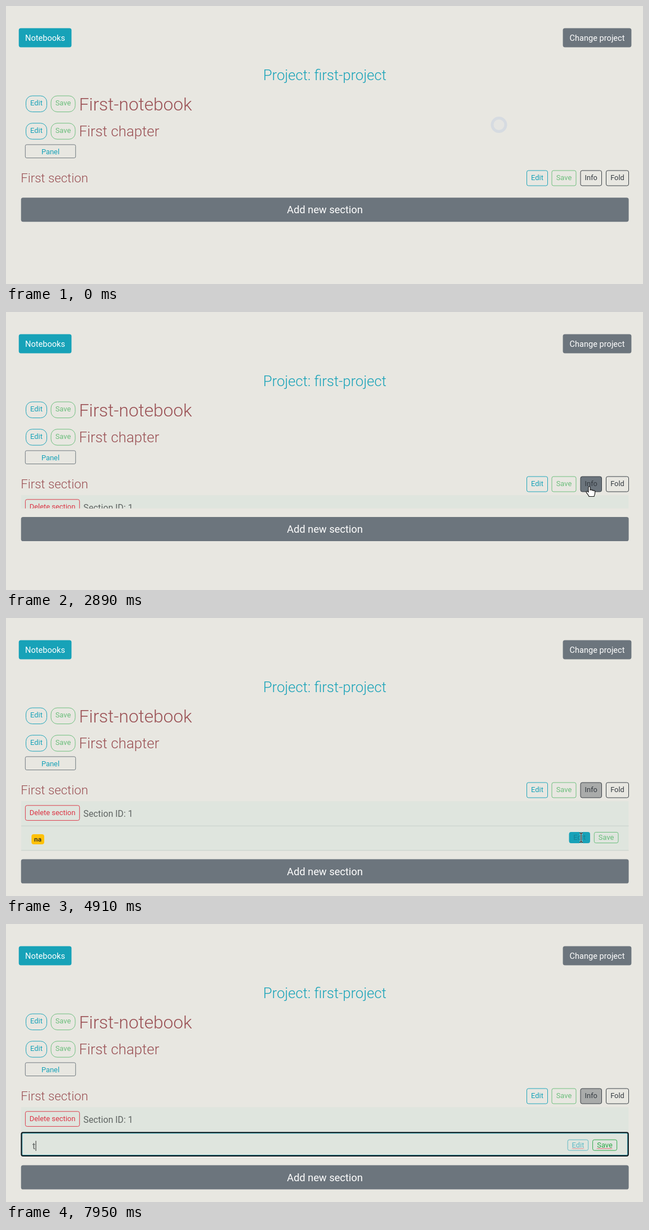
An HTML page for the animation above (8 s loop, 1132 by 495 pixels).

```html
<!DOCTYPE html>
<html lang="en">
<head>
<meta charset="utf-8">
<title>Notebook section editor</title>
<style>
  html, body { margin: 0; width: 100%; height: 100%; overflow: hidden; background: #e8e7e1; }
  svg { display: block; width: 1132px; height: 495px; font-family: Roboto, sans-serif; }
</style>
</head>
<body>
<svg id="stage" viewBox="0 0 1132 495"></svg>
<script>
const LOOP = 8000;
const stage = document.getElementById('stage');
const TEAL = '#17a2b8', GREEN = '#28a745', GREY = '#6c757d', DARK = '#343a40',
      RED = '#dc3545', BROWN = '#9a5054', INK = '#5f6462';

const clamp = v => Math.min(1, Math.max(0, v));
const ramp = (t, start, length = 150) => clamp((t - start) / length);

// CSS "ease", cubic-bezier(.25, .1, .25, 1)
function ease(x) {
  let lo = 0, hi = 1;
  for (let i = 0; i < 20; i++) {
    const u = (lo + hi) / 2;
    if (.75 * u * (1 - u) + u ** 3 < x) lo = u; else hi = u;
  }
  return .3 * lo * (1 - lo) ** 2 + 3 * lo * lo * (1 - lo) + lo ** 3;
}

const text = (s, x, y, size, fill, more = '') =>
  `<text x="${x}" y="${y}" font-size="${size}" fill="${fill}" ${more}>${s}</text>`;
const heading = (s, x, y, size, fill = BROWN, more = '') =>
  text(s, x, y, size, fill, `font-weight="300" ${more}`);
const centred = (s, x, y, size, fill) => text(s, x, y, size, fill, 'text-anchor="middle"');
const box = (x, y, w, h, r, fill, more = '') =>
  `<rect x="${x}" y="${y}" width="${w}" height="${h}" rx="${r}" fill="${fill}" ${more}/>`;

function solid(label, x, y, w, h, size, fill) {
  return box(x, y, w, h, 3.7, fill) + centred(label, x + w / 2, y + h / 2 + size * .35, size, '#fff');
}

// Outlined button; the baseline is given relative to the top edge
function outlined(label, x, y, w, h, base, color, { r = 3, faded = false, ink = color, under = '' } = {}) {
  return `<g opacity="${faded ? .65 : 1}">${under}` +
    box(x, y, w, h, r, 'none', `stroke="${color}" stroke-width=".95"`) +
    centred(label, x + w / 2, y + base, 12.9, ink) + '</g>';
}

function pair(x, y, r, h, base) {
  return outlined('Edit', x, y, 37, h, base, TEAL, { r }) +
         outlined('Save', x + 44.5, y, 43, h, base, GREEN, { r, faded: true });
}

function header() {
  return solid('Notebooks', 22.7, 39.5, 93.7, 34, 14.6, TEAL) +
    solid('Change project', 989.6, 39.5, 121.8, 34, 14.6, GREY) +
    heading('Project: first-project', 566.5, 131.5, 25.6, TEAL, 'text-anchor="middle"') +
    pair(35.5, 160, 11, 28.5, 17) + heading('First-notebook', 129.8, 186, 31.6) +
    pair(35.5, 208.7, 11, 28.5, 17.3) + heading('First chapter', 129.8, 232, 25.8) +
    outlined('Panel', 34.3, 246.9, 89.4, 23.6, 16.7, GREY, { r: 2.5, ink: TEAL }) +
    heading('First section', 26.2, 313.5, 22.2);
}

function sectionButtons(t) {
  const hover = ramp(t, 2130) - ramp(t, 3680);
  const fill = (color, alpha) => box(1021, 293, 37.5, 27, 3, color, `fill-opacity="${alpha}"`);
  const under = fill('#a9abaa', ramp(t, 2670)) + fill(GREY, hover);
  return pair(925.5, 293, 3, 27, 17.2) +
    outlined('Info', 1021, 293, 37.5, 27, 17.2, DARK, { under }) +
    outlined('Fold', 1066.5, 293, 40, 27, 17.2, DARK);
}

function tagRow(t) {
  if (t < 4960) {
    const hover = ramp(t, 4440);
    const under = box(1001, 381.5, 36.5, 19, 2.5, TEAL, `fill-opacity="${hover}"`);
    return box(27, 413.3, 1079.5, 1, 0, '#c8cfca') +
      box(45.3, 384.9, 22.6, 18, 4, '#ffc107') +
      text('na', 56.6, 397.6, 11.8, '#212529', 'text-anchor="middle" font-weight="500"') +
      outlined('Edit', 1001, 381.5, 36.5, 19, 13.7, TEAL, { under, ink: hover > .5 ? '#178296' : TEAL }) +
      outlined('Save', 1045.3, 381.5, 42.7, 19, 13.7, GREEN, { faded: true });
  }
  const typed = t < 6480 ? 'na' : t < 6640 ? 'n' : t < 7940 ? '' : 't';
  const caret = { na: 64.6, n: 55.8, t: 52.6 }[typed];
  const focus = t < 6000 ? '' :
    box(25.7, 369.7, 1081.6, 45, 4, 'none', 'stroke="#fff" stroke-opacity=".5"') +
    box(27.4, 371.3, 1078.4, 41.6, 3, 'none', 'stroke="#0c181d" stroke-width="2.1"');
  return box(28.8, 372.7, 1075.6, 38.8, 2, 'none', `stroke="${TEAL}" stroke-width=".9"`) + focus +
    text(typed, 47, 400.5, 15.8, INK) +
    (caret && t >= 6000 ? box(caret, 386, 1, 18, 0, '#333') : '') +
    outlined('Edit', 998.2, 384.2, 36.5, 19, 13.5, TEAL, { faded: true }) +
    outlined('Save', 1042.6, 384.2, 43, 19, 13.5, GREEN) +
    (typed === 't' ? squiggle(1006, 1027, .65) + squiggle(1050, 1078, 1) : '');
}

function squiggle(from, to, opacity) {
  let d = `M${from} 400.5`;
  for (let x = from + 1.5, up = true; x <= to; x += 1.5, up = !up) d += `L${x} ${up ? 399 : 400.5}`;
  return `<path d="${d}" fill="none" stroke="${RED}" stroke-width=".8" opacity="${opacity}"/>`;
}

function details(t) {
  const height = 88.3 * ease(ramp(t, 2825, 350));
  const panel = box(27, 326.2, 1079.5, 88, 0, '#dfe5de') +
    box(27, 369.7, 1079.5, 1, 0, '#c8cfca') +
    outlined('Delete section', 34.4, 333.8, 96.3, 26.6, 17.2, RED) +
    text('Section ID: 1', 137.6, 354, 15.8, INK) + tagRow(t);
  return `<clipPath id="fold"><rect x="0" y="326" width="1132" height="${height}"/></clipPath>` +
    `<g ${height < 88 ? 'clip-path="url(#fold)"' : ''}>${height > 0 ? panel : ''}</g>` +
    solid('Add new section', 26.7, 341.3 + height, 1079.9, 43, 18.3, GREY);
}

function ring(t) {
  const opacity = 1 - ramp(t, 50, 170);
  return `<circle cx="876" cy="211.5" r="12" fill="#e2e4e3" fill-opacity=".6" stroke="#d6dbe1" stroke-width="5" opacity="${opacity}"/>`;
}

const shapes = {
  arrow: '<path d="M0 0V19L4.4 15.1 7.4 22 10.8 20.5 7.8 13.9H13.6Z" fill="#111" stroke="#fff" stroke-width="1.1" stroke-linejoin="round"/>',
  hand: '<path d="M-2 10V1.3a1.6 1.6 0 0 1 3.2 0V6.5a1.5 1.5 0 0 1 3 .4 1.5 1.5 0 0 1 2.8.6 1.4 1.4 0 0 1 2.6.7V11.5c0 3-1.5 4-1.5 6H-1c0-2-3.5-4.5-5-8 .5-1.8 3-1.5 4 .5z" fill="#fff" stroke="#111" stroke-width="1.1" stroke-linejoin="round"/>',
  beam: [['#fff', 2.8], ['#222', 1.4]].map(([color, width]) =>
    `<path d="M-3-8.2Q-1-8.2 0-7.2 1-8.2 3-8.2M0-7.2V7.2M-3 8.2Q-1 8.2 0 7.2 1 8.2 3 8.2" fill="none" stroke="${color}" stroke-width="${width}"/>`).join('')
};

// Pointer stops: time, x, y
const stops = [
  [1300, 878, 213], [1730, 973, 295], [2100, 1036, 311], [2670, 1037, 311], [2890, 1037, 311],
  [3180, 1036, 312], [3600, 1036, 312], [4410, 1022, 391], [4980, 1022, 391], [6000, 113, 390], [8000, 113, 390]
];

function pointer(t) {
  if (t < 1300 || t >= 6450) return '';
  const i = stops.findIndex(s => s[0] > t);
  const [t0, x0, y0] = stops[i - 1], [t1, x1, y1] = stops[i];
  const p = (t - t0) / (t1 - t0);
  const k = t < 2100 ? p : p * p * (3 - 2 * p);
  const kind = t >= 4890 ? 'beam' : t >= 4400 || (t >= 2040 && t < 3740) ? 'hand' : 'arrow';
  return `<g transform="translate(${x0 + (x1 - x0) * k} ${y0 + (y1 - y0) * k})">${shapes[kind]}</g>`;
}

function draw(now) {
  const t = now % LOOP;
  stage.innerHTML = header() + sectionButtons(t) + details(t) + ring(t) + pointer(t);
  requestAnimationFrame(draw);
}
draw(0);
</script>
</body>
</html>
```
